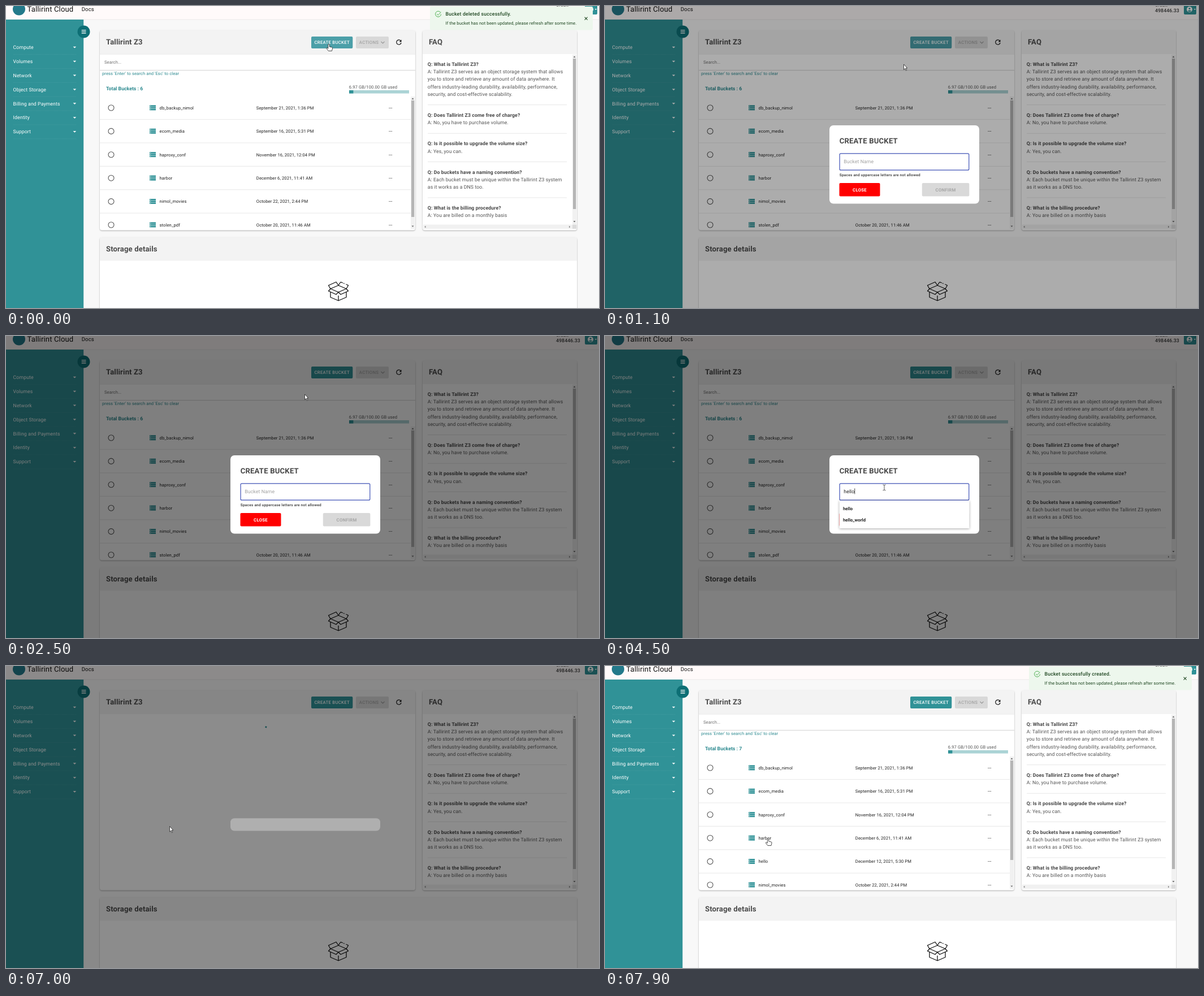
Animation of 1049 by 534 pixels, one loop 8 s. Source, as an HTML page:

```html
<!DOCTYPE html>
<html lang="en">
<head>
<meta charset="utf-8">
<title>Bucket console</title>
<style>
html, body { margin: 0; width: 100%; height: 100%; overflow: hidden; background: #f8f8f8; }
svg { display: block; width: 100%; height: 100%; }
text { font-family: Roboto, sans-serif; letter-spacing: .0095em; white-space: pre; text-rendering: geometricPrecision; }
.btn { letter-spacing: .03em; }
.caption { letter-spacing: .0333em; }
.card { filter: drop-shadow(0 1px 1px rgba(0,0,0,.3)); }
.menu { filter: drop-shadow(0 1px 2px rgba(0,0,0,.35)); }
</style>
</head>
<body>
<svg id="stage" viewBox="0 0 1049 534"></svg>
<script>
const TEAL = '#309297', HOVER = '#4b9fa8', INK = '#3c3c3c';
const stage = document.getElementById('stage');

const text = (x, y, s, size = 8.74, fill = INK, weight = 400, attrs = '') =>
  `<text x="${x}" y="${y}" font-size="${size}" fill="${fill}" font-weight="${weight}" ${attrs}>${s}</text>`;
const rect = (x, y, w, h, fill, attrs = '') =>
  `<rect x="${x}" y="${y}" width="${w}" height="${h}" fill="${fill}" ${attrs}/>`;
const line = (x1, x2, y, color, attrs = '') =>
  `<path d="M${x1} ${y}H${x2}" stroke="${color}" ${attrs}/>`;
const path = (d, stroke, width = 1, fill = 'none', attrs = '') =>
  `<path d="${d}" stroke="${stroke}" stroke-width="${width}" fill="${fill}" ${attrs}/>`;
const shape = (d, fill, attrs = '') => `<path d="${d}" fill="${fill}" ${attrs}/>`;
const group = (id, body, attrs = '') => `<g id="${id}" ${attrs}>${body}</g>`;
const label = (x, y, s, fill, weight = 500, id = '') =>
  text(x, y, s, 7.8, fill, weight, `class="btn" text-anchor="middle" ${id && `id="${id}"`}`);

const card = (x, y, w, h, headH, title) =>
  `<g class="card">${rect(x, y, w, h, '#fff', 'rx="4"')}</g>` +
  shape(`M${x} ${y + headH}V${y + 4}q0-4 4-4H${x + w - 4}q4 0 4 4V${y + headH}Z`, '#f3f3f3') +
  text(x + 11, y + 25.4, title, 13.11, '#4b4b4b', 700);

function sidebar() {
  const items = ['Compute', 'Volumes', 'Network', 'Object Storage', 'Billing and Payments', 'Identity', 'Support'];
  return rect(0, 24, 137.2, 510, TEAL) + items.map((s, i) => {
    const y = 73 + i * 24.87;
    return text(12.6, y + 3.1, s, 8.74, '#fff') +
      shape(`M118.6 ${y - 1.2}h5.6l-2.8 2.8z`, '#fff') +
      line(13, 125, y + 12.6, '#4fa2a6', 'stroke-width=".6" stroke-dasharray="1 1"');
  }).join('') +
    '<circle cx="137.5" cy="45.5" r="11" fill="#0d6f75"/>' +
    path('M133.7 42.9h7.8M133.7 45.5h7.8M133.7 48.1h7.8', '#fff', 1.1);
}

function header() {
  return rect(0, 0, 1049, 23.7, '#fffafa') + line(0, 1049, 24, '#e6e3e3', 'stroke-width=".7"') +
    '<circle cx="23" cy="5.5" r="11" fill="#23798a"/>' +
    text(37.5, 10, 'Tallirint Cloud', 13.11, '#111') +
    text(133.7, 9.2, 'Docs', 9.6, '#111') +
    text(973, 1.2, 'Credit', 8.2, INK) +
    text(973, 11, '498446.33', 8.74, INK, 500) +
    rect(1024, -4, 22, 19, TEAL, 'rx="2"') +
    '<circle cx="1034" cy="6" r="5" fill="#fff"/><circle cx="1034" cy="4.5" r="1.6" fill="#309297"/>' +
    shape('M1030.8 8.8q3.2-2.8 6.4 0q-3.2 2.8-6.4 0z', TEAL) +
    shape('M1041.3 5h4l-2 2z', '#fff');
}

function bucketCard() {
  return card(166, 43, 558, 353.5, 42, 'Tallirint Z3') +
    rect(540, 54, 73.3, 21, TEAL, 'rx="2" id="create"') + label(576.7, 67.4, 'CREATE BUCKET', '#fff') +
    rect(619, 54, 58, 21, '#d8d8d8', 'rx="2"') + label(642, 67.4, 'ACTIONS', '#a3a3a3') +
    path('M663.5 63l3 3 3-3', '#999', 1.2) +
    path('M698.2 61.3a4.2 4.2 0 1 0 .9 3.7', '#111', 1.2) + shape('M699.5 59.5v4h-4z', '#111') +
    group('content',
      line(166, 724, 85.3, '#e3e3e3', 'stroke-width=".7"') +
      text(174, 102.4, 'Search...', 7.65, '#707070') +
      line(166, 724, 113.7, '#b4b4b4', 'stroke-width=".6"') +
      text(170, 122.3, "press 'Enter' to search and 'Esc' to clear", 7.65, '#2d8a90') +
      text(177, 148.6, '', 8.74, '#2d8a90', 700, 'id="total" style="letter-spacing:0"') +
      text(606.8, 146.2, '6.97 GB/100.00 GB used', 7.65, '#555') +
      rect(607, 149, 106, 5.6, '#abd3d5') + rect(607, 149, 7.4, 5.6, TEAL) +
      group('rows', '', 'clip-path="url(#list)"') +
      rect(716, 160, 7.5, 234, '#f1f1f1') +
      rect(717, 167, 5.2, 206, '#b5b5b5', 'id="thumb"') +
      shape('M717.5 165h4l-2-2.4zM717.5 388.4h4l-2 2.4z', '#666')) +
    `<circle id="spinner" cx="445" cy="102" r="16" fill="none" stroke="${TEAL}" stroke-width="2.8"/>`;
}

function faqCard() {
  const faq = [
    [106, 'What is Tallirint Z3?', 'Tallirint Z3 serves as an object storage system that allows',
      'you to store and retrieve any amount of data anywhere. It',
      'offers industry-leading durability, availability, performance,', 'security, and cost-effective scalability.'],
    [196.2, 'Does Tallirint Z3 come free of charge?', 'No, you have to purchase volume.'],
    [246.4, 'Is it possible to upgrade the volume size?', 'Yes, you can.'],
    [296.7, 'Do buckets have a naming convention?', 'Each bucket must be unique within the Tallirint Z3 system',
      'as it works as a DNS too.'],
    [360.2, 'What is the billing procedure?', 'You are billed on a monthly basis']
  ];
  return card(737, 43, 273, 353.5, 42, 'FAQ') + faq.map(([y, q, ...a], i) =>
    text(745.8, y, 'Q: ' + q, 8.74, '#474747', 700) +
    a.map((s, j) => text(745.8, y + 13.2 * (j + 1), (j ? '' : 'A: ') + s, 8.74, '#555')).join('') +
    (i < 4 ? line(746, 992, y + 13.2 * a.length + 15.9, '#dedede', 'stroke-width=".7"') : '')).join('') +
    rect(1002, 86, 7.5, 300, '#f1f1f1') + rect(1003, 93, 5.2, 266, '#b5b5b5') +
    shape('M1003.5 91h4l-2-2.4zM1003.5 380h4l-2 2.4z', '#666') +
    rect(738, 386.5, 264, 7.5, '#f1f1f1') + rect(1002, 386.5, 7.5, 7.5, '#dcdcdc') +
    shape('M742.5 388.4v4l-2.2-2zM996 388.4v4l2.2-2z', '#888');
}

function storageCard() {
  return card(166, 409, 844, 140, 41.5, 'Storage details') +
    path('M574 500l14-6 14 6-14 6zM574 500l-3.5 4 13.5 6 4-4 4 4 13.5-6-3.5-4M574 500l-3.5-6 13.5-6 4 6 4-6M602 500l3.5-6-4-2' +
      'M574 506v9l14 6 14-6v-9M588 512v9', '#111', 1.3, 'none', 'stroke-linejoin="round"') +
    path('M592 488l8 3.5', '#111', 1.3, 'none', 'stroke-dasharray="4 1.5 1.5 1.5"');
}

function toast() {
  return rect(750, 1, 288, 41.5, '#edf7ed', 'rx="2"') +
    path('M768.5 11.2a5 5 0 1 0 1 3.3M762 14l2.2 2.2 5.3-5.3', '#4caf50', 1) +
    text(777.5, 17.2, '', 8.74, '#1e4620', 500, 'id="toastTitle" style="letter-spacing:.02em"') +
    text(777.5, 32.6, 'If the bucket has not been updated, please refresh after some time.', 7.65, '#1e4620') +
    path('M1023.6 19.6l5 5m0-5l-5 5', '#1e4620', 1.1);
}

function dialog() {
  return group('panel', rect(397, 211, 265, 138.5, '#fff', 'rx="7" id="sheet"') + group('form',
    text(414.7, 242.8, 'CREATE BUCKET', 13.11, '#474747', 700, 'style="letter-spacing:.015em"') +
    rect(415.1, 260.9, 228.7, 29.3, '#fff', 'rx="2" stroke="#3f51b5" stroke-width="1.2" id="field"') +
    text(422.3, 278, '', 8.74, '#222', 400, 'id="value"') +
    rect(0, 269.5, .8, 10, '#111', 'id="caret"') +
    text(414.7, 301, 'Spaces and uppercase letters are not allowed', 6.56, '#4c4c4c', 700, 'class="caption"') +
    rect(414.5, 313, 72, 23.4, '#f00', 'rx="2" id="close"') + label(450.5, 327.5, 'CLOSE', '#fff', 700, 'closeText') +
    rect(560.8, 313, 83.6, 23.4, '#d9d9d9', 'rx="2" id="confirm"') +
    '<circle id="ripple" cx="600" cy="343" r="17" fill="#fff" opacity=".22" clip-path="url(#press)"/>' +
    label(602.6, 327.5, 'CONFIRM', '#fff', 700, 'confirmText') +
    group('menu', '')));
}

stage.innerHTML =
  `<defs><clipPath id="list">${rect(166, 160, 550, 233)}</clipPath><clipPath id="press">${rect(561, 313, 83, 23)}</clipPath></defs>` +
  rect(0, 0, 1049, 534, '#f8f8f8') + bucketCard() + faqCard() + storageCard() + header() + sidebar() +
  group('toast', toast()) + rect(0, 0, 1049, 534, '#000', 'id="shade"') + dialog() +
  group('pointer',
    path('M-1.2 1Q0-.8 1.2 1V5L5.5 6Q6.8 6.5 6.5 8L5.4 12.5H-.6L-4 8.2Q-4.4 6.6-3 6.8L-1.2 8.2Z', '#222', .8, '#fff', 'id="hand"') +
    path('M.5.5V10L2.7 8 4.3 11.7 5.7 11 4.1 7.4H6.8Z', '#222', .8, '#fff', 'id="arrow"') +
    path('M-2.5-5Q0-5 0-3.5Q0-5 2.5-5M0-3.5V3.5M-2.5 5Q0 5 0 3.5Q0 5 2.5 5', '#444', .9, 'none', 'id="beam"'));

const el = {};
stage.querySelectorAll('[id]').forEach(n => el[n.id] = n);
const set = (id, attrs) => { for (const k in attrs) el[id].setAttribute(k, attrs[k]); };
const show = (id, on) => { el[id].style.display = on ? '' : 'none'; };

const buckets = [
  ['db_backup_nimol', 'September 21, 2021, 1:36 PM'], ['ecom_media', 'September 16, 2021, 5:31 PM'],
  ['haproxy_conf', 'November 16, 2021, 12:04 PM'], ['harbor', 'December 6, 2021, 11:41 AM'],
  ['hello', 'December 12, 2021, 5:30 PM'], ['nimol_movies', 'October 22, 2021, 2:44 PM'],
  ['stolen_pdf', 'October 20, 2021, 11:46 AM']
];
const rowsHtml = list => list.map(([name, date], i) => {
  const y = 180 + i * 41.4;
  const bars = [-4.6, -1.4, 1.8].map(d => rect(254, y + d, 11, 2.6, TEAL) + rect(255, y + d + .8, 1.1, 1, '#fff')).join('');
  return `<circle cx="186" cy="${y}" r="5" fill="none" stroke="#555" stroke-width="1.1"/>` + bars +
    text(271.6, y + 2.8, name, 7.65, '#222') + text(442.8, y + 2.8, date, 7.65, '#222') +
    text(677, y + 2.8, '---', 7.65, '#222') + line(166, 716, y + 20.6, '#dedede', 'stroke-width=".7"');
}).join('');
const rowsBefore = rowsHtml(buckets.filter(b => b[0] !== 'hello')), rowsAfter = rowsHtml(buckets);

const history = ['hello', 'hello_world', 'media', 'backup', 'test', 'files'];
const menuHtml = (items, active) => rect(414.7, 291, 229.8, items.length * 20 + 9, '#fff', 'class="menu"') +
  (active >= 0 ? rect(414.7, 295.5 + active * 20, 229.8, 20, '#e4e4e4') : '') +
  items.map((s, i) => text(421, 308.2 + i * 20, s, 7.8, '#222', 700, 'style="letter-spacing:0"')).join('');

// start time, cursor kind, x, y
const moves = [
  [0, 'hand', 571, 67], [200, 'hand', 571, 63], [800, 'arrow', 550, 84], [900, 'arrow', 528, 102.5],
  [3200, 'beam', 494, 268], [5300, 'arrow', 570, 324], [5800, 'hand', 601, 328], [6100, 'hand', 601.5, 334.5],
  [6800, 'arrow', 601, 334], [7000, 'arrow', 289, 283], [7200, 'arrow', 291, 296], [7400, 'arrow', 291, 302],
  [7600, 'hand', 289, 304], [7800, 'hand', 288.5, 305]
];
const typed = [[0, ''], [3800, 'h'], [3900, 'he'], [4500, 'hello'], [5300, 'hello_world'], [5800, 'hello']];
const last = (table, t) => table.filter(r => r[0] <= t).pop();

const cache = {};
function html(id, s) {
  if (cache[id] !== s) el[id].innerHTML = cache[id] = s;
}

function draw(t) {
  const [, kind, x, y] = last(moves, t);
  for (const k of ['hand', 'arrow', 'beam']) show(k, k === kind);
  set('pointer', { transform: `translate(${x} ${y})` });

  const done = t >= 7600, loading = t >= 7000 && !done;
  show('content', !loading);
  html('rows', done ? rowsAfter : rowsBefore);
  html('total', 'Total Buckets : ' + (done ? 7 : 6));
  set('thumb', { height: done ? 176 : 206 });
  set('create', { fill: t < 1500 ? HOVER : TEAL });

  show('spinner', loading);
  const arc = t < 7200 ? 2.8 : t < 7400 ? 28 : 62;
  set('spinner', { 'stroke-dasharray': arc + ' 200', transform: `rotate(${17 + (t - 7000) * .26} 445 102)` });

  const toastAlpha = t < 800 ? 1 : t < 900 ? .4 : t < 7600 ? 0 : Math.min(1, .85 + (t - 7600) / 2000);
  set('toast', { opacity: toastAlpha });
  html('toastTitle', done ? 'Bucket successfully created.' : 'Bucket deleted successfully.');

  const p = Math.min(1, Math.max(0, (t - 800) / 700));
  const open = t >= 800 && t < 7200, closing = t >= 7000;
  show('shade', open);
  set('shade', { opacity: closing ? .45 : .5 * (1 - (1 - p) ** 1.9) });
  show('panel', open);
  set('panel', { opacity: closing ? .3 : Math.min(1, (t - 700) / 300) });
  set('sheet', closing ? { y: 269.2, height: 22.3 } : { y: 211, height: 138.5 });
  show('form', !closing);

  const value = last(typed, t)[1], preview = t >= 5300 && t < 5800;
  html('value', value || 'Bucket Name');
  set('value', { fill: value ? '#222' : '#a2a2a2' });
  set('field', { fill: preview ? '#e8f0fe' : '#fff' });
  show('caret', t >= 3800 && t < 5300);
  if (open && !closing && value) set('caret', { x: 422.3 + el.value.getComputedTextLength() });

  show('menu', t >= 3200 && t < 5800);
  html('menu', menuHtml(history.slice(0, t < 3800 ? 6 : 2), preview ? 1 : -1));

  const ready = t >= 5300 && t < 6800, busy = t >= 6800;
  set('confirm', { fill: ready ? '#38949b' : '#d9d9d9' });
  set('confirmText', { fill: ready ? '#fff' : '#a6a6a6' });
  set('close', { fill: busy ? '#d9d9d9' : '#f00' });
  set('closeText', { fill: busy ? '#a6a6a6' : '#fff' });
  show('ripple', t >= 6100 && t < 6800);
}

function tick(now) {
  draw(Math.floor(now % 8000 / 100) * 100);
  requestAnimationFrame(tick);
}
draw(0);
requestAnimationFrame(tick);
</script>
</body>
</html>
```
